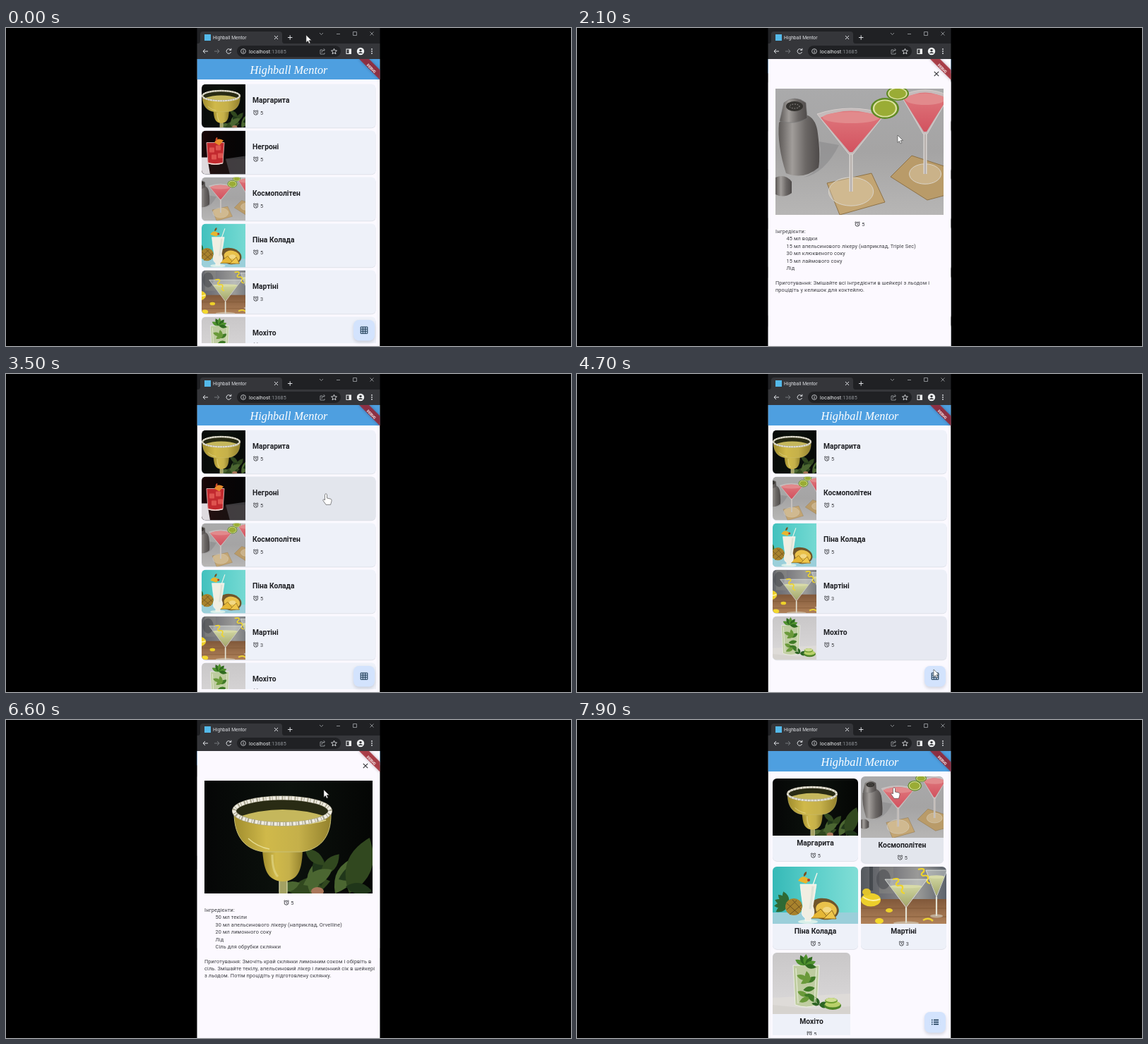
An HTML page for the animation above (8 s loop, 800 by 451 pixels).

```html
<!DOCTYPE html>
<html lang="uk">
<head>
<meta charset="utf-8">
<title>Highball Mentor</title>
<style>
  html, body { margin: 0; width: 100%; height: 100%; overflow: hidden; background: #000; }
  svg { display: block; }
  #stage { width: 100vw; height: 100vh; }
  text { font-family: Roboto, sans-serif; font-size: 7.3px; letter-spacing: .15px; fill: #3b3c40; white-space: pre; }
  .name { font-size: 10.3px; font-weight: 700; letter-spacing: 0; fill: #1f2024; }
  .line { fill: none; stroke: #dfe1e5; stroke-width: 1; }
  .clock { fill: none; stroke: #35363a; stroke-width: .9; }
</style>
</head>
<body>
<svg id="stage" viewBox="0 0 800 451"></svg>
<script>
const LOOP = 8000;
const stage = document.getElementById('stage');
const $ = id => document.getElementById(id);

// ---------- drawing helpers ----------
const rect = (x, y, w, h, fill, more = '') => `<rect x="${x}" y="${y}" width="${w}" height="${h}" fill="${fill}" ${more}/>`;
const oval = (x, y, rx, ry, fill, more = '') => `<ellipse cx="${x}" cy="${y}" rx="${rx}" ry="${ry}" fill="${fill}" ${more}/>`;
const path = (d, fill, more = '') => `<path d="${d}" fill="${fill}" ${more}/>`;
const stroke = (d, color, w, more = '') => path(d, 'none', `stroke="${color}" stroke-width="${w}" ${more}`);
const text = (x, y, s, more = '') => `<text x="${x}" y="${y}" ${more}>${s}</text>`;
const leaf = (x, y, a, len, fill, w = len * .42) =>
  path(`M0 0Q${len / 2} ${-w} ${len} 0Q${len / 2} ${w} 0 0`, fill, `transform="translate(${x} ${y}) rotate(${a})"`);
const grad = (id, down, ...stops) => `<linearGradient id="${id}" x2="${down ? 0 : 1}" y2="${down ? 1 : 0}">` +
  stops.map((c, i) => `<stop offset="${i / (stops.length - 1)}" stop-color="${c}"/>`).join('') + '</linearGradient>';
const clip = (id, x, y, w, h, r = 0) => `<clipPath id="${id}">${rect(x, y, w, h, '#000', `rx="${r}"`)}</clipPath>`;
const timer = (x, y, n) => `<g class="clock"><circle cx="${x}" cy="${y + .3}" r="2.9"/>` +
  `<path d="M${x} ${y - 1.4}v2l1.3.9M${x - 3.7} ${y - 2}l1.8-1.5M${x + 3.7} ${y - 2}l-1.8-1.5"/></g>` + text(x + 6.3, y + 2.8, n);

// ---------- drink pictures ----------
const margarita = () => rect(0, 0, 238, 160, 'url(#night)') +
  [[120, 158, -15, 60], [150, 160, -75, 50], [165, 150, -95, 48], [165, 135, -50, 40], [185, 160, -60, 60], [190, 140, -25, 50],
   [205, 160, -70, 84], [140, 148, -28, 46], [200, 150, 10, 38], [170, 120, -140, 36], [105, 156, -20, 32]]
    .map(([x, y, a, l], i) => leaf(x, y, a, l, ['#31481f', '#4b6631', '#20361a'][i % 3])).join('') +
  oval(160, 157, 9, 6, '#a9765a') +
  rect(106, 138, 11, 22, '#a3a163') + stroke('M106 140v20M117 140v20', '#dcdcb0', 1.2) +
  path('M82 98C84 125 88 142 111 143C134 142 138 125 139 98Z', 'url(#lime)') +
  path('M42 46C42 82 60 98 84 101H136C162 98 180 82 179 46Z', 'url(#lime)', 'stroke="#c8bf76"') +
  oval(110, 43, 67, 18, '#292b14') + path('M46 52Q110 30 176 52Q110 78 46 52', '#c5b75c') +
  stroke('M92 60Q140 66 172 56M62 82Q75 94 92 97', '#e6dc90', 1.5) +
  stroke('M96 105Q96 128 104 136', '#e6dc90', 3, 'opacity=".6"') +
  oval(110, 43, 68, 18.5, 'none', 'stroke="#a9a58f" stroke-width="6"') +
  oval(110, 43, 68, 18.5, 'none', 'stroke="#f0ede2" stroke-width="5" stroke-dasharray="4 2 2 1"');

const coupe = (x, y, w, h, foot) => oval(x, foot, w * .66, w * .42, '#e8dcc5', 'fill-opacity=".35" stroke="#d9d3c8"') +
  stroke(`M${x} ${y + h}V${foot}`, '#d8d3d0', 5) + stroke(`M${x} ${y + h}V${foot}`, '#9f9793', 1.2) +
  path(`M${x - w} ${y}Q${x} ${y - 16} ${x + w} ${y}L${x + 3} ${y + h}H${x - 3}Z`, '#d9c9c9', 'fill-opacity=".6" stroke="#d5cfcd"') +
  path(`M${x - w * .9} ${y + 5}Q${x} ${y - 14} ${x + w * .9} ${y + 5}L${x + 2} ${y + h - 3}H${x - 2}Z`, 'url(#pink)') +
  oval(x, y + 5, w * .84, 8, '#e28a8c');

const slice = (x, y, rx, ry) => oval(x, y, rx, ry, '#5f8a24') + oval(x, y, rx * .86, ry * .84, '#dde2a0') + oval(x, y, rx * .74, ry * .72, '#9aac35');

const cosmo = () => rect(0, 0, 238, 179, 'url(#stone)') +
  path('M40 126Q70 115 62 75L90 80Q70 120 40 126', '#858587', 'opacity=".5"') +
  path('M5 48Q20 36 46 38Q58 44 60 64Q64 95 61 112Q40 130 15 120Q2 80 5 48', 'url(#steel)') +
  path('M12 20Q27 8 43 20L45 42Q27 52 6 46Z', 'url(#steel)', 'stroke="#777" stroke-width=".6"') +
  oval(27, 25, 12, 7, '#34322f') + oval(27, 25, 7, 3, 'none', 'stroke="#a9a5a2" stroke-dasharray="1.5 2"') +
  path('M0 126Q14 120 23 132V148Q12 156 0 150Z', 'url(#steel)') +
  path('M73 134L136 120L155 161L91 179Z', '#c3a573', 'stroke="#8d7247"') +
  path('M163 125L193 95L245 112V150L215 158Z', '#b99b69', 'stroke="#8d7247"') +
  coupe(212, 10, 34, 54, 121) + slice(173, 7, 16, 10) +
  coupe(107, 36, 48, 57, 146) + slice(155, 28, 20, 15);

const pina = () => rect(0, 0, 121, 81, 'url(#sea)') + rect(0, 65, 121, 16, '#9bcfda') +
  [150, 175, 200, 225, 250].map(a => leaf(22, 54, a, 20, '#2f6a35')).join('') +
  oval(30, 57, 12, 12, '#a8822c') + stroke('M20 52l17 15M20 61l14-13M28 47l13 14M24 68l17-14', '#6d5120', 1) +
  oval(73, 60, 21, 15, '#70552a', 'transform="rotate(12 73 60)"') + oval(76, 61, 15, 11, '#e9c14b', 'transform="rotate(12 76 61)"') +
  oval(77, 61, 6, 4, '#f2d884') + path('M52 73L68 60L79 73Z', '#e6b735', 'stroke="#8f6a20"') + path('M72 74L84 62L90 74Z', '#f0c74b', 'stroke="#8f6a20"') +
  oval(50, 78, 14, 3, '#d9efe9') + stroke('M57 26L63 9', '#f5f5ea', 1.4) +
  path('M39 25H62Q59 45 57 56Q62 68 54 73V77H46V73Q38 68 43 56Q41 45 39 25', '#f1eee2', 'stroke="#fff" stroke-width=".7"') +
  stroke('M57 28Q55 48 53 60', '#d3ddd0', 3, 'opacity=".6"') +
  path('M36 20Q42 9 53 19L47 24Z', '#e8b52f') + leaf(44, 14, -60, 8, '#7c521e') + oval(51, 19, 2, 2, '#b23a2a');

const tini = (x, y, w, h, foot) => stroke(`M${x} ${y + h}V${foot}`, '#e3e2d4', 2.2) + oval(x, foot, w * .6, 2.5, '#d9d6c6', 'opacity=".6"') +
  path(`M${x - w} ${y}H${x + w}L${x} ${y + h}Z`, '#dfe4df', 'fill-opacity=".45" stroke="#e8ebe6" stroke-width=".8"') +
  path(`M${x - w * .75} ${y + h * .25}H${x + w * .75}L${x} ${y + h - 2}Z`, 'url(#gin)') + oval(x, y + h * .25, w * .75, 2.3, '#d8dba8');

const curl = (x, y) => stroke(`M${x - 6} ${y - 6}q10-3 8 3q-6 4-1 6q8-2 7 4q-4 5 3 7`, '#f0d52c', 2.2);

const martini = () => rect(0, 0, 121, 81, 'url(#bar)') + rect(12, 0, 5, 34, '#33383d', 'opacity=".6"') + rect(26, 0, 20, 38, '#8d8c86', 'opacity=".45"') +
  oval(32, 18, 10, 14, '#43454a', 'opacity=".5"') + rect(0, 46, 121, 35, 'url(#wood)') + stroke('M0 59H121M0 71H121', '#7c5434', .8) +
  oval(14, 47, 14, 9.5, '#eccf2b') + stroke('M3 43Q14 51 27 46', '#fff2a0', 2) + oval(8, 36, 6, 5, '#e2c52c') +
  tini(107, 5, 15, 38, 70) + curl(87, 10) + tini(64, 18, 30, 40, 80) + curl(51, 24) +
  oval(26, 77, 6, 4, '#f3d82e') + oval(40, 62, 5, 3, '#edd02a') + stroke('M88 76q8-5 14 1', '#ecd133', 2.5);

const mojito = () => rect(0, 0, 110, 87, 'url(#wall)') + path('M0 64L110 58V87H0Z', '#dedbd8') + path('M0 74L60 80L110 76V87H0Z', '#d0cbc8', 'opacity=".5"') +
  path('M29 18H66L63 74Q48 80 32 74Z', '#bdcd9c', 'fill-opacity=".9" stroke="#eef0e6"') +
  [[34, 32, 20], [62, 34, 150], [40, 44, -30], [60, 50, 170], [35, 55, 25], [61, 64, 195], [38, 70, -25], [50, 58, 50], [48, 26, 80]]
    .map(([x, y, a], i) => leaf(x, y, a, 17, i % 2 ? '#3f7a26' : '#6a9a3a')).join('') +
  stroke('M33 22L36 72M62 22L59 72', '#eef3df', 1.4, 'opacity=".7"') +
  [-150, -115, -85, -50, -20, 10].map((a, i) => leaf(46, 18, a, 16, i % 2 ? '#2f6a1f' : '#4f922e')).join('') +
  [-170, -110, -20, 20].map(a => leaf(66, 74, a, 11, '#2c6423')).join('') +
  oval(85, 75, 12, 6, '#4f8427') + oval(85, 73, 11, 4.5, '#b9d06a') + oval(83, 68, 9, 4, '#6f9f2f') + oval(83, 67, 8, 3, '#cfdd92');

const negroni = () => rect(0, 0, 62, 62, '#060506') + path('M0 42L62 40V62H0Z', '#1b1413') + rect(0, 0, 62, 62, 'url(#dusk)') +
  path('M0 38H8L12 62H0Z', '#dedade') + path('M34 40L62 36V62H40Z', '#5d5a60', 'opacity=".6"') +
  path('M7 17H32L30 46Q19 50 9 46Z', '#c22a2f', 'stroke="#e4b7b5" stroke-width=".9"') +
  [[11, 24], [20, 21], [14, 34], [23, 32]].map(([x, y]) => rect(x, y, 7, 7, '#ef6a61', 'opacity=".65" rx="1"')).join('') +
  stroke('M9 46Q19 49 30 46', '#f1d4cf', 1.5) + path('M18 17Q22 9 31 14L25 21Z', '#e68a2b') + leaf(20, 15, -70, 6, '#d5502d');

// ---------- data ----------
const drinks = [
  { id: 'margarita', art: margarita, name: 'Маргарита', min: 5, w: 238, h: 160, grid: [277, 83, 121, 81] },
  { id: 'negroni', art: negroni, name: 'Негроні', min: 5, w: 62, h: 62 },
  { id: 'cosmo', art: cosmo, name: 'Космополітен', min: 5, w: 238, h: 179, grid: [402, 80, 117, 87] },
  { id: 'pina', art: pina, name: 'Піна Колада', min: 5, w: 121, h: 81, grid: [277, 208, 121, 81] },
  { id: 'martini', art: martini, name: 'Мартіні', min: 3, w: 121, h: 81, grid: [402, 208, 121, 81] },
  { id: 'mojito', art: mojito, name: 'Мохіто', min: 5, w: 110, h: 87, grid: [277, 330, 110, 87] },
];

const recipes = {
  cosmo: [['45 мл водки', '15 мл апельсинового лікеру (наприклад, Triple Sec)', '30 мл клюквеного соку', '15 мл лаймового соку', 'Лід'],
    ['Приготування: Змішайте всі інгредієнти в шейкері з льодом і', 'процідіть у келишок для коктейлю.']],
  margarita: [['50 мл текіли', '30 мл апельсинового лікеру (наприклад, Orvelline)', '20 мл лимонного соку', 'Лід', 'Сіль для обрубки склянки'],
    ['Приготування: Змочіть край склянки лимонним соком і обірвіть в', 'сіль. Змішайте текілу, апельсиновий лікер і лимонний сік в шейкері', 'з льодом. Потім процідіть у підготовлену склянку.']],
};

// ---------- parts ----------
const picture = (d, x, y, w, h) => `<svg x="${x}" y="${y}" width="${w}" height="${h}" viewBox="0 0 ${d.w} ${d.h}" ` +
  `preserveAspectRatio="xMidYMid slice"><use href="#${d.id}"/></svg>`;

const face = (x, y, w, h, id) => rect(x, y + .8, w, h, '#d9dbe4', 'rx="6"') + rect(x, y, w, h, '#eef1f9', 'rx="6"') +
  rect(x, y, w, h, '#1b1b1f', `rx="6" opacity="0" id="${id}"`);

const row = d => `<g id="row-${d.id}">` + face(277, 0, 246.5, 62, 'lh-' + d.id) +
  `<g clip-path="url(#rowClip)">${picture(d, 277, 0, 62, 62)}</g>` + text(349, 26.6, d.name, 'class="name"') + timer(353.7, 40.5, d.min) + '</g>';

const tile = d => {
  const [x, y, w, h] = d.grid, c = x + w / 2, base = y + h;
  return clip('clip-' + d.id, x, y, w, h + 37, 6) + face(x, y, w, h + 36, 'gh-' + d.id) +
    `<g clip-path="url(#clip-${d.id})">${picture(d, x, y, w, h)}</g>` +
    text(c, base + 14.2, d.name, 'class="name" text-anchor="middle"') + timer(c - 3, base + 28, d.min);
};

const detail = id => {
  const d = drinks.find(k => k.id === id), [items, steps] = recipes[id], end = 86 + d.h;
  const at = i => end + 26 + i * 10.38;
  return `<g id="page-${id}">` + rect(270.5, 44, 259, 407, '#fcf9ff') + stroke('M505.8 61.8l6.4 6.4m0-6.4l-6.4 6.4', '#333438', 1.2) +
    picture(d, 281, 86, d.w, d.h) + timer(397, end + 13, d.min) + text(281, at(0), 'Інгредієнти:') +
    items.map((s, i) => text(296.5, at(i + 1), s)).join('') + steps.map((s, i) => text(281, at(items.length + 2 + i), s)).join('') + '</g>';
};

const chrome = () => rect(270.5, 0, 259, 22, '#202124') + path('M272 22Q275 22 275 18V9Q275 5 279 5H387Q391 5 391 9V18Q391 22 394 22Z', '#35363a') +
  rect(281, 9, 9, 9, '#54b9ea') + text(293, 16.2, 'Highball Mentor', 'style="font-size:6.7px;fill:#dfe1e5;letter-spacing:0"') +
  rect(270.5, 22, 259, 22, '#35363a') + rect(327, 25, 147, 16, '#202124', 'rx="8"') +
  text(344, 35.7, 'localhost<tspan fill="#8f9398">:13685</tspan>', 'style="font-size:7.2px;fill:#eceef0;letter-spacing:.1px"') +
  '<path class="line" d="M380 11l5 5m0-5l-5 5M399 13.5h6.4m-3.2-3.2v6.4M286 33h-7m3-3l-3 3 3 3M318 31a3.3 3.3 0 1 0 .5 3M318.8 28.8v2.6h-2.6"/>' +
  '<path class="line" style="stroke:#a4a7ab;stroke-width:.8" d="M444 7l2.5 2.5 2.5-2.5M468 8.5h5M491.500 5.500h5v5h-5zM515.500 5.500l5 5m0-5l-5 5M448 31h-3v6h6v-2M447 35q0-4 4-4m-1.500-2l2 2-2 2"/>' +
  '<path class="line" style="stroke:#75787c" d="M295 33h7m-3-3l3 3-3 3"/>' +
  '<circle class="line" style="stroke-width:.8" cx="336" cy="33" r="3.400"/>' + rect(335.6, 32.4, .9, 2.6, '#dfe1e5') + rect(335.6, 30.9, .9, .9, '#dfe1e5') +
  '<path class="line" style="stroke-width:.9" d="M464.500 29.300l1.100 2.600 2.900.2-2.200 1.900.7 2.800-2.500-1.500-2.500 1.500.7-2.800-2.200-1.900 2.900-.2z"/>' +
  rect(482, 30, 6.5, 6.5, 'none', 'stroke="#f1f3f4"') + rect(485.5, 30, 3, 6.5, '#f1f3f4') +
  oval(502, 33, 5.2, 5.2, '#f1f3f4') + oval(502, 31.6, 1.7, 1.7, '#35363a') + path('M498.700 36q3.300-4 6.600 0z', '#35363a') +
  [30, 33, 36].map(y => oval(518, y, .9, .9, '#dfe1e5')).join('');

const fab = () => rect(492, 416, 30, 30, '#8d93a3', 'rx="8" opacity=".35" filter="url(#soft)"') + rect(492, 414, 30, 29.5, '#d3e3fd', 'rx="8"') +
  stroke('M502.200 424h9.600v9.200h-9.600zM502.200 427.100h9.600M502.200 430.100h9.600M505.400 424v9.200M508.600 424v9.200', '#0e2f49', 1, 'id="gridIcon"') +
  stroke('M502 425.500h1.500M505 425.500h7M502 428.500h1.500M505 428.500h7M502 431.500h1.500M505 431.500h7', '#0e2f49', 1.3, 'id="listIcon"');

stage.innerHTML = '<defs>' +
  grad('night', 0, '#050606', '#0c120d', '#040504') + grad('lime', 0, '#a08d2e', '#d0b94a', '#c5b04a', '#94822d') +
  grad('stone', 1, '#aaaaab', '#a5a4a4', '#b7b6b5') + grad('steel', 0, '#5d5957', '#a19d9a', '#6b6765', '#4e4a49') +
  grad('pink', 1, '#e0797e', '#d2525f') + grad('sea', 0, '#35b9b7', '#5ccfca', '#82ded6') + grad('gin', 1, '#cfd4a0', '#a4a86c') +
  grad('bar', 0, '#55595e', '#75757a', '#9a9a98', '#5c626b') + grad('wood', 1, '#80583a', '#b0825a') +
  grad('wall', 1, '#c9c7c8', '#dcdadb') + grad('dusk', 0, 'rgba(60,8,10,.4)', 'rgba(0,0,0,0)') +
  '<filter id="soft" x="-30%" y="-30%" width="160%" height="160%"><feGaussianBlur stdDeviation="2"/></filter>' +
  clip('rowClip', 277, 0, 246.5, 62, 6) + clip('view', 270.5, 73, 259, 374) + clip('page', 270.5, 44, 259, 407) +
  drinks.map(d => `<g id="${d.id}">${d.art()}</g>`).join('') + '</defs>' +
  rect(0, 0, 800, 451, '#000') + chrome() +
  '<g clip-path="url(#page)">' + rect(270.5, 44, 259, 407, '#fbf9ff') + '<g id="home">' + rect(270.5, 44, 259, 29, '#4e9fe0') +
  text(400.5, 65, 'Highball Mentor', 'text-anchor="middle" style="font:italic 16.3px \'Liberation Serif\',serif;letter-spacing:0;fill:#fff"') +
  `<g clip-path="url(#view)"><g id="list">${drinks.map(row).join('')}</g><g id="grid">${drinks.filter(d => d.grid).map(tile).join('')}</g></g>` +
  fab() + '</g>' + detail('cosmo') + detail('margarita') +
  path('M499 43L531 75V61L513 43Z', '#30101a', 'opacity=".3" filter="url(#soft)"') + path('M500 44L530 74V60L514 44Z', '#a01c26', 'opacity=".78"') +
  '<text transform="translate(516.800 57.800) rotate(45)" y="1" text-anchor="middle" style="font-size:5px;font-weight:700;fill:#fff;letter-spacing:0">DEBUG</text></g>' +
  '<g id="cursor" stroke="#3a3a3a" stroke-width=".6" fill="#fff"><path id="arrow" d="M0 0V10.500L2.500 8.300 4 12 5.800 11.200 4.200 7.600 7.500 7.400z"/>' +
  '<path id="hand" d="M0 0c1 0 1.500.6 1.500 1.500V6l4.500 1c1.400.3 2 1 2 2.300 0 2-.8 3.500-1.400 6H0L-4 9.500c-.8-1.200.8-2.200 1.800-1.200L-1.500 9V1.500C-1.500.6-1 0 0 0z"/></g>';

// ---------- motion ----------
const clamp = v => Math.min(1, Math.max(0, v));
const ease = p => p * p * (3 - 2 * p);
const ramp = (t, from, to) => ease(clamp((t - from) / (to - from)));

const GRID_AT = 5000;
const opened = {
  cosmo: t => ramp(t, 1250, 1600) - ramp(t, 2800, 3100),
  margarita: t => ramp(t, 5950, 6300) - ramp(t, 6950, 7250),
};

const track = [[0, 425, 10], [100, 425, 12], [280, 425, 12], [1100, 440, 240], [1900, 440, 240], [2100, 454, 152], [2390, 454, 152],
  [2650, 509, 65], [2900, 509, 65], [3450, 453, 170], [3550, 453, 170], [3700, 400, 172], [3950, 505, 174], [4180, 505, 176],
  [4680, 505, 419], [5080, 505, 419], [5580, 377, 200], [5650, 377, 200], [5800, 365, 140], [6400, 365, 140], [6600, 450, 99],
  [6800, 509, 65], [7300, 509, 65], [7850, 449, 96], [LOOP, 449, 96]];

function pointer(t) {
  const i = track.findIndex(k => k[0] > t), [t0, x0, y0] = track[i - 1], [t1, x1, y1] = track[i];
  const p = ramp(t, t0, t1);
  return [x0 + (x1 - x0) * p, y0 + (y1 - y0) * p];
}

const swipe = t => 105 * ramp(t, 3700, 3950) + 165 * ramp(t, 3930, 4120);
const collapse = t => ramp(t, 4130, 4400);
const rowY = (i, t) => 79.5 + 66 * (i - (i > 1 ? collapse(t) : 0));

// Id of the card under the pointer
function hovered(t) {
  if (Object.values(opened).some(f => f(t) > 0)) return null;
  const [x, y] = pointer(t), inside = (l, top, w, h) => x >= l && x <= l + w && y >= top && y <= top + h;
  if (y > 447 || inside(492, 414, 30, 30)) return null;
  const hit = t < GRID_AT
    ? drinks.find((d, i) => !(d.id === 'negroni' && t > 4100) && inside(277, rowY(i, t), 246.5, 62))
    : drinks.find(d => d.grid && inside(d.grid[0], d.grid[1], d.grid[2], d.grid[3] + 36));
  return hit ? hit.id : null;
}

function glow(t) {
  const out = {};
  for (let s = 250; s >= 0; s -= 10) {
    const id = t >= s && hovered(t - s);
    if (id) out[id] = 1 - s / 250;
  }
  return out;
}

const show = (id, on) => { $(id).style.display = on ? '' : 'none'; };
const zoom = (id, k) => $(id).setAttribute('transform', `translate(400 247.5) scale(${k}) translate(-400 -247.5)`);

function draw(t) {
  const grid = t >= GRID_AT, shade = glow(t);
  show('list', !grid); show('gridIcon', !grid);
  show('grid', grid); show('listIcon', grid);
  drinks.forEach((d, i) => {
    const out = d.id === 'negroni';
    $('row-' + d.id).setAttribute('transform', `translate(${out ? swipe(t) : 0} ${rowY(i, t)})`);
    show('row-' + d.id, !out || t < 4130);
    const o = (shade[d.id] || 0) * .05;
    $('lh-' + d.id).setAttribute('opacity', o);
    if (d.grid) $('gh-' + d.id).setAttribute('opacity', o);
  });
  let most = 0;
  for (const id in opened) {
    const p = opened[id](t);
    most = Math.max(most, p);
    show('page-' + id, p > 0);
    zoom('page-' + id, .85 + .15 * p);
    $('page-' + id).setAttribute('opacity', clamp(p * 1.6));
  }
  zoom('home', 1 + .05 * most);
  const [x, y] = pointer(t), hand = hovered(t) !== null;
  $('cursor').setAttribute('transform', `translate(${x} ${y})`);
  show('hand', hand); show('arrow', !hand);
}

const start = performance.now();
function tick() {
  draw((performance.now() - start) % LOOP);
  requestAnimationFrame(tick);
}
tick();
</script>
</body>
</html>
```
